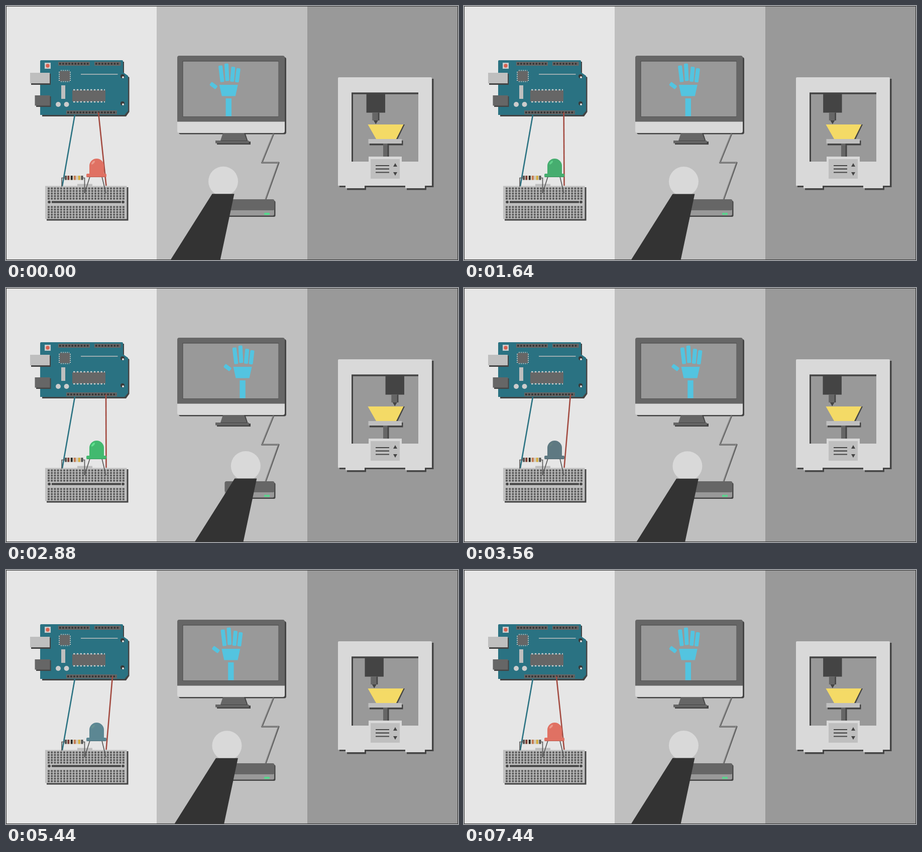
Write an HTML page that moves like this. It is 900 px wide and 506 px high and loops after 7480 ms.

```html
<!DOCTYPE html>
<html lang="en">
<head>
<meta charset="utf-8">
<title>Workshop</title>
<style>
html, body { margin: 0; width: 100%; height: 100%; overflow: hidden; background: #bfbfbf; }
svg { display: block; width: 900px; height: 506px; }
</style>
</head>
<body>
<svg viewBox="0 0 900 506">
  <defs><clipPath id="mid"><path d="M300 0H600V506H300z"/></clipPath></defs>
  <path fill="#e6e6e6" d="M0 0H300V506H0z"/>
  <path fill="#bfbfbf" d="M300 0H600V506H300z"/>
  <path fill="#999" d="M600 0H900V506H600z"/>

  <!-- controller board -->
  <g id="board">
    <path fill="#444" d="M72 111H235V135L245.500 142V211L239 220H72z"/>
    <path fill="#2a7282" d="M70 108H231Q233 108 233 110V132L243 139V209L236 217H68V110Q68 108 70 108z"/>
    <path fill="#444" d="M50 135H89V157H50zM60 180H89.500V201H60z"/>
    <path fill="#bfbfbf" d="M48 133H87V154H48zM110 158H118V185H110z"/>
    <path fill="#666" d="M57.500 178H87.500V198.500H57.500z"/>
    <path fill="#ccc" d="M77 113H89V125H77z"/>
    <circle cx="83" cy="119" r="3.700" fill="#d9604f"/>
    <path fill="#666" d="M104 111H167V119H104zM176 111H228.500V119H176zM120 208H221V216H120z"/>
    <g stroke="#333" stroke-width="3.500" stroke-dasharray="3.500 2.600">
      <path d="M106 115H166M178 115H227M122 212H220"/>
    </g>
    <g stroke="#bfbfbf" stroke-width="2" stroke-dasharray="2 2">
      <path d="M109 128.500H126M109 150.500H126M106 131V149M128 131V149"/>
    </g>
    <path fill="#666" d="M107 129.500H127V149.500H107zM132 168H198V190H132z"/>
    <g stroke="#ccc" stroke-width="2.500" stroke-dasharray="3.500 3.300">
      <path d="M134 167H197M134 191H197"/>
    </g>
    <path stroke="#bfbfbf" stroke-width="1.700" d="M149 136H222.500"/>
    <g fill="#ccc"><circle cx="104" cy="196" r="5"/><circle cx="120.500" cy="196" r="5"/></g>
    <g fill="#3a3a3a"><circle cx="232" cy="140" r="4"/><circle cx="232" cy="194" r="4"/></g>
    <g fill="#e6e6e6"><circle cx="233" cy="142" r="2"/><circle cx="233" cy="196" r="2"/></g>
  </g>

  <!-- breadboard -->
  <path fill="#444" d="M81 361H243.500V427.500H81z"/>
  <path fill="#bfbfbf" d="M78 358.500H240.500V424.500H78zM142 354.500H172V360H142z"/>
  <g id="holes" fill="#5c5c5c"></g>
  <path stroke="#444" stroke-width="4" d="M91 390.500H229"/>
  <g fill="#444"><circle cx="86" cy="390.500" r="2.800"/><circle cx="233" cy="390.500" r="2.800"/></g>

  <g fill="none" stroke-width="2.600">
    <path stroke="#2a7282" d="M137 217L112 359"/>
    <path id="wire" stroke="#a34b41"/>
  </g>
  <g fill="none" stroke="#5a5a5a" stroke-width="1.700">
    <path d="M111 360V342.500H118M152 342.500H156.500V373M167 340L156.500 373M191 340L199 373"/>
  </g>
  <path fill="#d0c9b8" d="M117 338H153.500V346.500H117z"/>
  <path fill="#555" d="M117 338H121V346.500H117zM149.500 338H153.500V346.500H149.500z"/>
  <path fill="#7b3833" d="M122.500 338H126V346.500H122.500z"/>
  <path fill="#222" d="M129 338H132.500V346.500H129z"/>
  <path fill="#c46a3e" d="M135.500 338H138.500V346.500H135.500z"/>
  <path fill="#d6ad37" d="M144 338H147.500V346.500H144z"/>
  <g id="led">
    <path d="M166 334V318.500A14.500 14.500 0 0 1 195 318.500V334H198Q200 334 200 336V339Q200 341 198 341H162Q160 341 160 339V336Q160 334 162 334z"/>
    <ellipse id="shine" cx="173.500" cy="312" rx="2" ry="4.600" transform="rotate(42 173.500 312)"/>
  </g>
  <path stroke="#000" stroke-opacity=".18" d="M160 340.500H199.500"/>

  <!-- monitor and sensor -->
  <rect x="344" y="102" width="214" height="153.500" rx="4" fill="#444"/>
  <path fill="#444" d="M435 255H477L482 270H487V276H420V271H429z"/>
  <path fill="#666" d="M432 253H474L479.500 268H483.500V273.500H417V268H427z"/>
  <path stroke="#444" d="M428 268.500H480"/>
  <path fill="#666" d="M345 99H551Q555 99 555 103V231H341V103Q341 99 345 99z"/>
  <path fill="#d9d9d9" d="M341 230.500H555V249Q555 253 551 253H345Q341 253 341 249z"/>
  <path fill="#444" d="M351.500 109.500H543V220.500H351.500z"/>
  <path fill="#999" d="M352.500 110.500H542.500V220H352.500z"/>
  <g id="hand" fill="#53c4e0">
    <path d="M-18.500 157H18.500L13.500 179.500H-13.500zM-5.700 184H5.700V219.500H-5.700z"/>
  </g>
  <g fill="none" stroke-linejoin="round">
    <path stroke="#5c5c5c" stroke-width="3.200" d="M533 254L509.500 312H543L517 385"/>
    <path stroke="#999" stroke-width="1.200" d="M532.300 254L508.900 311.500H542L516.300 385"/>
  </g>
  <rect x="438" y="388" width="98.500" height="32" rx="3" fill="#444"/>
  <rect x="435.500" y="386" width="98.500" height="31.500" rx="3" fill="#999"/>
  <rect x="435.500" y="385" width="99" height="22" rx="3.500" fill="#666"/>
  <rect x="514" y="412" width="11" height="4" rx="1.500" fill="#55d98d"/>
  <path id="gap" stroke="#8fa596" d="M519.500 412V416"/>
  <g clip-path="url(#mid)">
    <g id="arm">
      <circle r="29.500" fill="#d9d9d9"/>
      <path fill="#333" d="M-22 25H22L-9 171H-114z"/>
    </g>
  </g>

  <!-- printer -->
  <path fill="#444" fill-rule="evenodd" d="M664 145H851.500V361H837V366.500H798V361H717V366.500H679V361H664zM691 175.500H821V310H691z"/>
  <path fill="#d9d9d9" fill-rule="evenodd" d="M663 142H846Q848 142 848 144V358H834V363H795V358H714V363H676V358H661V144Q661 142 663 142zM688 172.500V310H821V172.500z"/>
  <path fill="#444" d="M688 172.500H821V175.500H691V310H688z"/>
  <path fill="#444" d="M724 268H790.500V277.500H724zM755 277H762.500V300H755z"/>
  <path fill="#666" d="M751 274H759.500V300H751z"/>
  <path fill="#bfbfbf" d="M721.500 265H788V274H721.500z"/>
  <path fill="#444" d="M726 236H794L780 265H740z"/>
  <path fill="#f4da66" d="M720.500 236H791.500L777 265H737z"/>
  <g id="head">
    <path fill="#444" d="M-18.700 173H18.700V212.500H-18.700zM-5 227H5L0 235.500z"/>
    <path fill="#666" d="M-7 212.500H7V228H-7z"/>
    <path fill="#444" d="M4.500 212.500H7V228H4.500z"/>
  </g>
  <path fill="#d9d9d9" d="M722 300H788V312H722z"/>
  <path fill="#bfbfbf" d="M726 305H784V344H726z"/>
  <path stroke="#444" stroke-width="2.200" d="M736 318H763M736 324.700H763M736 331.500H763"/>
  <path fill="#444" d="M771 320H779L775 313zM771 331H779L775 338z"/>
  <rect x=".5" y=".5" width="899" height="505" fill="none" stroke="#333"/>
</svg>
<script>
const LOOP = 7480, STEP = 40, SWING = 3760, PEAK = 2660;
const $ = id => document.getElementById(id);
const svg = (parent, tag, attrs) => {
  const el = document.createElementNS('http://www.w3.org/2000/svg', tag);
  for (const k in attrs) el.setAttribute(k, attrs[k]);
  parent.append(el);
};

// Breadboard holes: two blocks of five rows
for (const top of [361.5, 398.5])
  for (let r = 0; r < 5; r++)
    for (let c = 0; c < 25; c++)
      svg($('holes'), 'rect', { x: 83 + c * 6.2, y: top + r * 5.1, width: 4, height: 3.8 });

// Thumb and fingers: centre x, centre y, length, angle
const fingers = [[-30, 158.5, 15, -53], [-14.5, 135, 33, -7], [-3.5, 132, 35, -3], [8, 136, 30, 5], [18, 138, 28, 7]];
for (const [x, y, len, a] of fingers)
  svg($('hand'), 'rect', { x: -4, y: -len / 2, width: 8, height: len, rx: 2, transform: `translate(${x} ${y}) rotate(${a})` });

const OFF = [96, 104, 108];
const colours = [
  { on: [224, 113, 99], shine: [236, 154, 140] },
  { on: [66, 185, 111], shine: [95, 226, 143] },
  { on: [83, 196, 226], shine: [110, 226, 222] }
];
const slots = [184, 199, 212];
// Each change: fade out, move the wire, fade in
const changes = [
  { out: [800, 960], move: [1000, 1700], on: [1400, 1680], to: 1 },
  { out: [3080, 3240], move: [3000, 3500], on: [3500, 3820], to: 2 },
  { out: [5360, 5480], move: [5480, 6000], on: [5880, 6080], to: 0 }
];

const part = (t, [a, b]) => Math.min(1, Math.max(0, (t - a) / (b - a)));
const ease = u => u * u * (3 - 2 * u);
const mix = (a, b, u) => a + (b - a) * u;
const rgb = (a, b, u) => `rgb(${a.map((v, i) => Math.round(mix(v, b[i], u)))})`;
const wave = (t, period) => Math.cos(2 * Math.PI * (t - PEAK) / period);

function drawCircuit(t) {
  let x = slots[0], hue = 0, power = 1, from = 0;
  for (const { out, move, on, to } of changes) {
    if (t < Math.min(out[0], move[0])) break;
    x = mix(slots[from], slots[to], ease(part(t, move)));
    hue = t < on[0] ? from : to;
    power = t < on[0] ? 1 - part(t, out) : part(t, on);
    from = to;
  }
  $('wire').setAttribute('d', `M${x} 212L199.500 358`);
  $('led').setAttribute('fill', rgb(OFF, colours[hue].on, power));
  $('shine').setAttribute('fill', rgb(OFF, colours[hue].shine, power));
}

function draw(t) {
  const swing = wave(t, SWING);
  const dip = t > PEAK && t < PEAK + SWING / 2 ? 4.5 * Math.sin(2 * Math.PI * (t - PEAK) / SWING) : 0;
  const x = 442.4 + 37.4 * swing;
  $('arm').setAttribute('transform', `translate(${x} ${350 + 3 * swing + dip})`);
  $('hand').setAttribute('transform', `translate(${443.2 + (x - 432.4) * 0.62} 0)`);
  $('head').setAttribute('transform', `translate(${756.7 + 23.7 * wave(t, SWING / 2)} 0)`);
  $('gap').setAttribute('opacity', (t > 1200 && t < 4400) || t > 7000 ? 1 : 0);
  drawCircuit(t);
}

const start = performance.now();
function tick() {
  const t = (performance.now() - start) % LOOP;
  draw(Math.floor(t / STEP) * STEP);
  requestAnimationFrame(tick);
}
tick();
</script>
</body>
</html>
```
